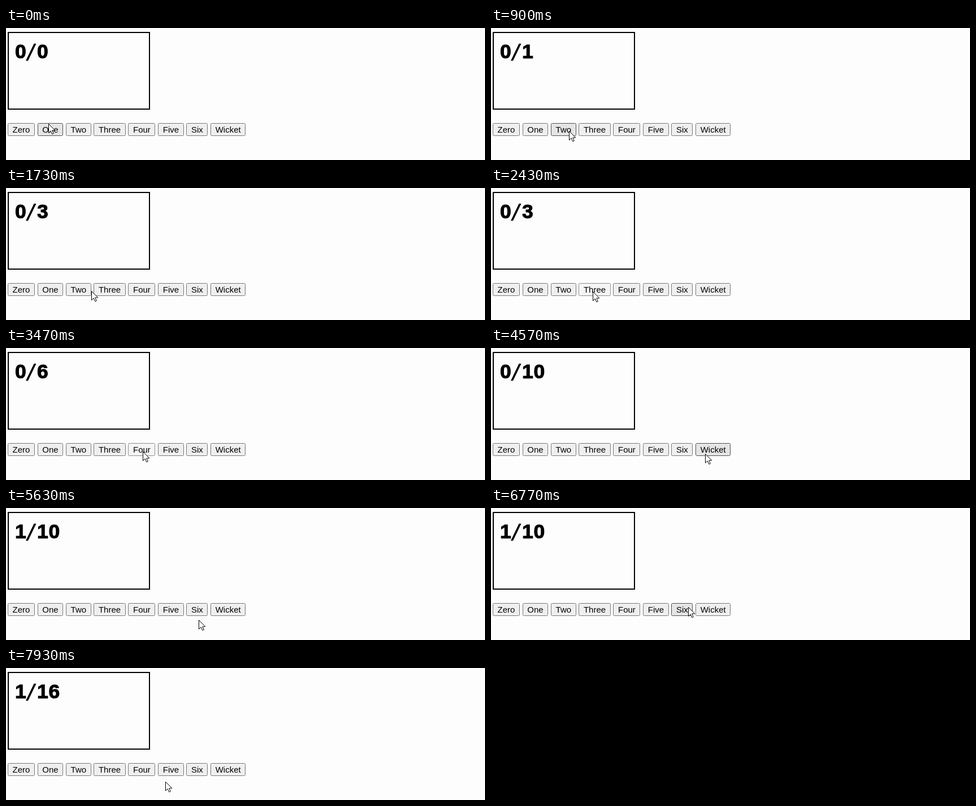
These frames come from a looping animation (848x236 px, 8 s). An HTML page:

```html
<!DOCTYPE html>
<html lang="en">
<head>
<meta charset="utf-8">
<title>Score counter</title>
<style>
  html, body { margin: 0; width: 100%; height: 100%; overflow: hidden; background: #fdfdfd; }
  svg { position: absolute; left: 0; top: 0; }
  .score { font: bold 35.5px "Liberation Sans", Arial, sans-serif; letter-spacing: .8px; }
  .score text { stroke: #000; stroke-width: 1.1px; }
  #buttons { position: absolute; left: 3px; top: 170px; display: flex; gap: 4.7px; }
  .button {
    box-sizing: border-box; height: 23px; padding: 0 7.6px;
    border: 1px solid #767676; border-radius: 2.5px; background: #efefef;
    font: 15px/21px "Liberation Sans", Arial, sans-serif;
  }
  .hover { background: #e5e5e5; border-color: #4f4f4f; }
  .active { background: #f5f5f5; border-color: #8d8d8d; }
</style>
</head>
<body>
<div id="buttons"></div>
<svg width="848" height="236" viewBox="0 0 848 236">
  <rect x="4" y="8" width="250" height="137" fill="none" stroke="#000" stroke-width="2"/>
  <g class="score">
    <text id="wickets" x="16" y="54">0</text>
    <path d="M35 58.5 49.5 28H53.5L39 58.5z"/>
    <text id="runs" x="55" y="54">0</text>
  </g>
  <path id="cursor" d="M.5 .5V16.5L4.2 13 6.8 18.8 9.3 17.7 6.8 12H11.8z" fill="#fff" stroke="#000"/>
</svg>
<script>
const LOOP = 8000;
const MOVE = 360;   // travel time between stops
const PAUSE = 450;  // rest on a button before pressing it
const PRESS = 110;  // how long a button is held down

// The pointer clicks at every stop that lies on a button.
const stops = [
  { arrive: -250, x: 75, y: 171 },
  { arrive: 850, x: 138, y: 184 },
  { arrive: 1960, x: 180, y: 185 },
  { arrive: 2990, x: 242, y: 185 },
  { arrive: 4530, x: 379, y: 189 },
  { arrive: 5630, x: 344, y: 199 },
  { arrive: 5950, x: 270, y: 217 },
  { arrive: 6330, x: 349, y: 177 },
  { arrive: 7930, x: 282, y: 203 }
];

const byId = id => document.getElementById(id);

const buttons = "Zero One Two Three Four Five Six Wicket".split(" ").map(label => {
  const node = document.createElement("div");
  node.textContent = label;
  node.className = "button";
  byId("buttons").append(node);
  return node;
});
const boxes = buttons.map(node => node.getBoundingClientRect());

const buttonAt = (x, y) => boxes.findIndex(box =>
  x >= box.left && x < box.right && y >= box.top && y < box.bottom);

const clicks = stops
  .map(({ arrive, x, y }) => ({ down: arrive + PAUSE, index: buttonAt(x, y) }))
  .filter(({ index }) => index >= 0);

const ease = p => p * p * (3 - 2 * p);

function pointerAt(time) {
  let { x, y } = stops[0];
  for (const stop of stops) {
    const p = ease(Math.min(1, Math.max(0, (time - stop.arrive) / MOVE + 1)));
    x += (stop.x - x) * p;
    y += (stop.y - y) * p;
  }
  return [Math.round(x), Math.round(y)];
}

function draw(time) {
  const [x, y] = pointerAt(time);
  byId("cursor").setAttribute("transform", `translate(${x} ${y})`);

  let runs = 0, wickets = 0, pressed = -1;
  for (const { down, index } of clicks) {
    if (time < down) break;
    if (time < down + PRESS) pressed = index;
    else if (index === buttons.length - 1) wickets++;
    else runs += index;
  }
  byId("runs").textContent = runs;
  byId("wickets").textContent = wickets;

  const hovered = buttonAt(x, y);
  buttons.forEach((node, index) => {
    node.classList.toggle("hover", index === hovered);
    node.classList.toggle("active", index === pressed);
  });
}

const start = performance.now();
function tick() {
  draw((performance.now() - start) % LOOP);
  requestAnimationFrame(tick);
}
tick();
</script>
</body>
</html>
```
